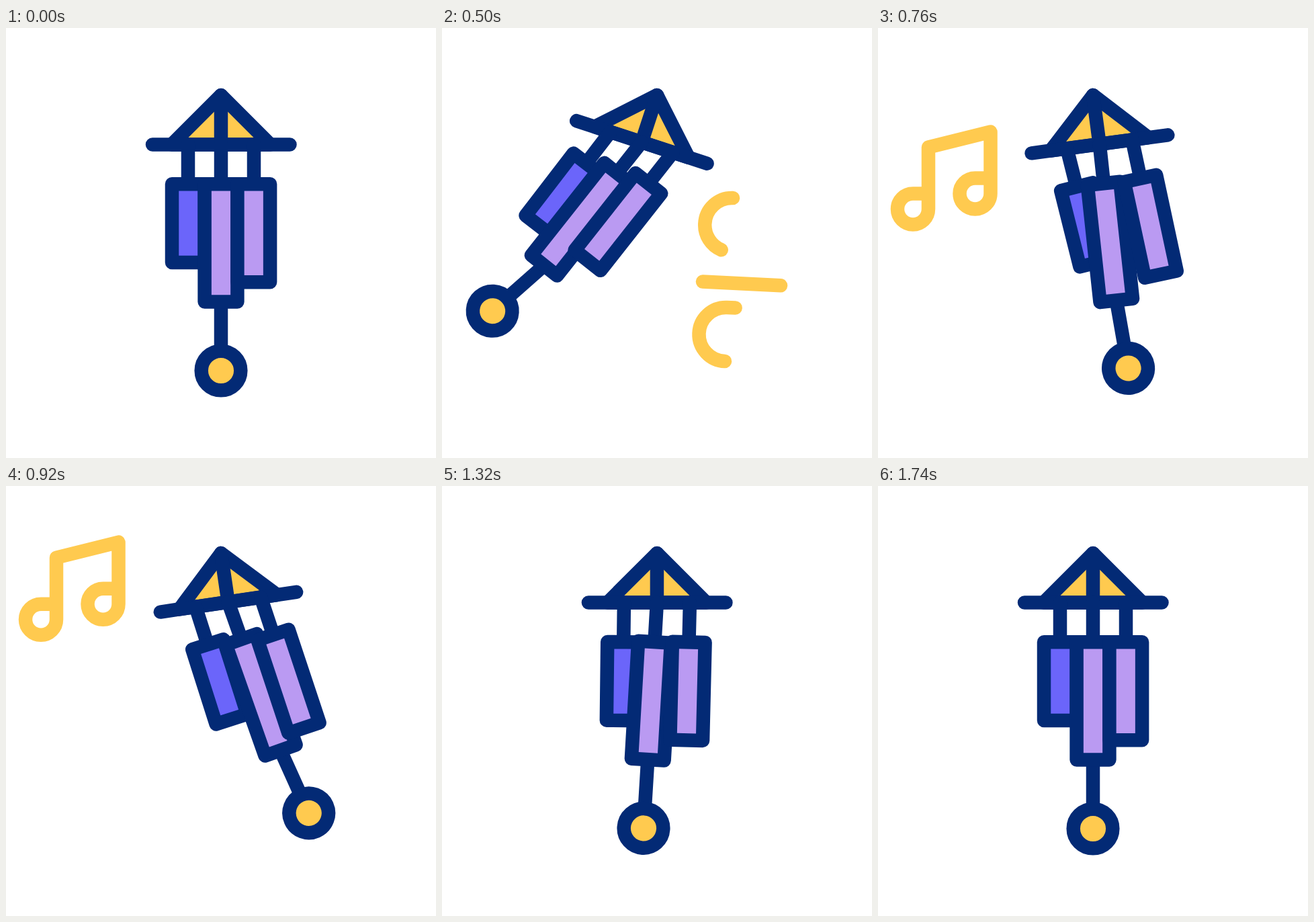
An HTML page that plays this animation: 640x640 px, repeating every 2400 ms.

```html
<!DOCTYPE html>
<html lang="en">
<head>
<meta charset="utf-8">
<title>Wind chime</title>
<style>
  html, body { margin: 0; height: 100%; overflow: hidden; background: #fff; }
  svg { display: block; width: 100vw; height: 100vh; }
  .chime { stroke: #032a75; }
  .air { stroke: #ffca4f; }
  .gold { fill: #ffca4f; }
  .blue { fill: #6b65fa; }
  .lilac { fill: #ba9af2; }
</style>
</head>
<body>
<svg viewBox="0 0 640 640" fill="none" stroke-width="20.5" stroke-linecap="round" stroke-linejoin="round">
  <g class="air">
    <path class="wind" pathLength="1" d="M486 336L430 333.5A40 40 0 0 1 433 253"/>
    <path class="wind" pathLength="1" d="M497 419L424 416A40 40 0 0 0 421 496"/>
    <path class="wind" pathLength="1" d="M538 385L388 377.5"/>
    <path id="note" d="M75 176H52a23 23 0 1 0 23 23V107L167.5 84V176a23 23 0 1 1 -23 -23h23"/>
  </g>
  <!-- gain: first swing in degrees from vertical; lag: delay in ms -->
  <g class="chime swing" data-gain="20.1" data-lag="4" style="transform-origin: 320px 100px">
    <path class="gold" d="M320 100L246.5 173.5H393.5Z"/>
    <path d="M320 100V173.5M218 173.5H422.5"/>
    <g class="swing" data-gain="40.5" data-lag="14" style="transform-origin: 271px 173.5px">
      <path d="M271 173.5V232"/>
      <path class="blue" d="M247 232.3h48.7v116.7h-48.7z"/>
    </g>
    <g class="swing" data-gain="38.4" data-lag="62" style="transform-origin: 320px 173.5px">
      <path d="M320 173.5V232"/>
      <g class="swing" data-gain="49" data-lag="52" style="transform-origin: 320px 407.5px">
        <path d="M320 407.5V480"/>
        <circle class="gold" cx="320" cy="510" r="29.3"/>
      </g>
      <path class="lilac" d="M295.6 232.3h48.8v175.2h-48.8z"/>
    </g>
    <g class="swing" data-gain="40" data-lag="27" style="transform-origin: 369px 173.5px">
      <path d="M369 173.5V232"/>
      <path class="lilac" d="M344.4 232.3h48.7v146h-48.7z"/>
    </g>
  </g>
</svg>
<script>
const LOOP = 2400, REST = 1740;
const ramp = (t, a, b) => Math.min(1, Math.max(0, (t - a) / (b - a)));
const ease = (t, a, b) => (1 - Math.cos(Math.PI * ramp(t, a, b))) / 2;

// Turning points of the dying swing that every part shares: [time, share of gain]
const beats = [[0, 0], [430, 1], [840, -.525], [1180, .345], [1410, -.17], [1640, .015], [REST, 0]];

const swings = document.querySelectorAll(".swing");
const winds = document.querySelectorAll(".wind");
const note = document.getElementById("note");

function angle({ gain, lag }, t) {
  if (!gain) return 0;
  // The lag is largest at the first peak and gone at both ends
  const late = at => at + lag * Math.sin(Math.PI * Math.sqrt(at / REST));
  let share = 0;
  beats.slice(1).forEach(([at, value], i) => {
    const [from, last] = beats[i];
    share += (value - last) * ease(t, late(from), late(at));
  });
  return gain * share;
}

function draw(t) {
  for (const part of swings) {
    const turn = angle(part.dataset, t) - angle(part.parentNode.dataset, t);
    part.style.transform = `rotate(${turn}deg)`;
  }
  winds.forEach(({ style }, i) => {
    const headStart = 80 + 35 * i, tailStart = 364 + 18 * i;
    const head = ease(t, headStart, headStart + 320);
    const tail = ease(t, tailStart, tailStart + 320);
    style.visibility = head - tail > .001 ? "visible" : "hidden";
    style.strokeDasharray = `${head - tail} 2`;
    style.strokeDashoffset = -tail;
  });
  const rise = 127.4 - 188 * ease(t, 520, 1170);
  note.setAttribute("transform", `translate(0 ${rise})`);
  note.setAttribute("opacity", Math.min(ramp(t, 520, 655), 1 - ramp(t, 1015, 1150)));
}

const start = performance.now();
function tick() {
  draw((performance.now() - start) % LOOP);
  requestAnimationFrame(tick);
}
tick();
</script>
</body>
</html>
```
